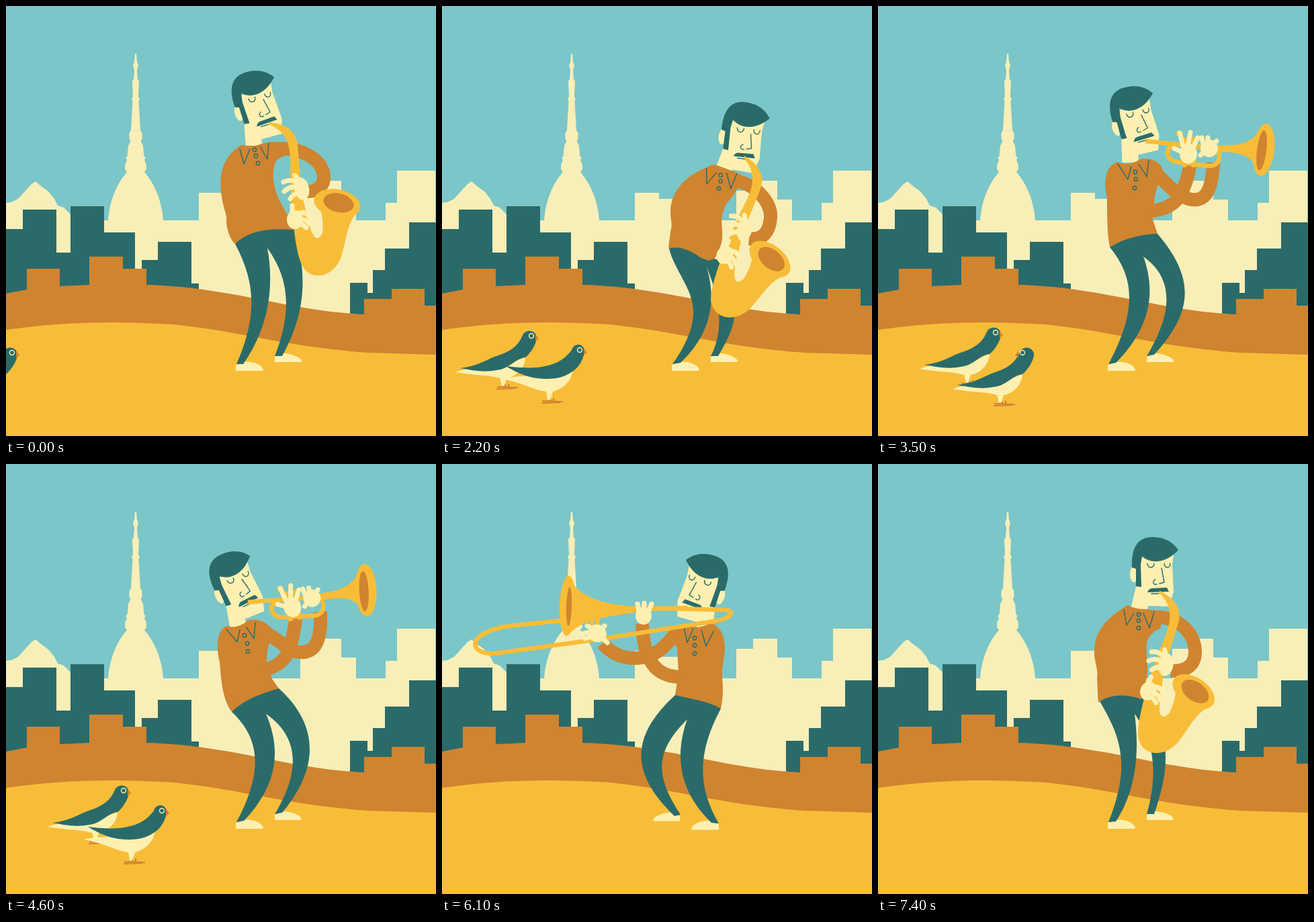
Recreate the animation shown at these times as an HTML page. Size 640 by 640 pixels, loop 7.5 s.

```html
<!DOCTYPE html>
<html lang="en">
<head>
<meta charset="utf-8">
<title>Street musician</title>
<style>
html, body { margin: 0; width: 100%; height: 100%; overflow: hidden; background: #7bc6c8; }
svg { display: block; width: 100vw; height: 100vh; }
.cream { fill: #f8eeb8; }
.skin { fill: #fdf0b0; }
.teal { fill: #2a6b6a; }
.brown { fill: #cf8430; }
.gold { fill: #f8bd38; }
.line { fill: none; stroke: #2a6b6a; stroke-width: 1.4; stroke-linecap: round; stroke-linejoin: round; }
.arm { fill: none; stroke: #cf8430; stroke-width: 20; }
.finger { fill: none; stroke: #fdf0b0; stroke-width: 7; stroke-linecap: round; }
.tube { fill: none; stroke: #f8bd38; stroke-width: 6.5; stroke-linejoin: round; }
.toe { fill: none; stroke: #cf8430; stroke-width: 2.2; stroke-linecap: round; }
</style>
</head>
<body>
<svg viewBox="0 0 640 640">
  <defs>
    <path id="spire" d="M192.5 71H194L195 83L197 88L195 95L196 110L198 111L197 135L199 138L197.5 142L200 185L202.5 189V198L200.5 201L204 208L205.5 224L208 226L206 229L209 237V243L206 247C222 266 232 290 234 319H192.5Z"/>
  </defs>
  <rect width="640" height="640" fill="#7bc6c8"/>
  <g class="cream">
    <path d="M0 293L8 292L18 287L27 277L38 265L44 261L52 268L63 276L72 287L77 297L86 300L95 309L100 319H287V278H323V287H360V319H438V275H463V260H499V288H521V319H565V293H582V245H639V470H0Z"/>
    <use href="#spire"/>
    <use href="#spire" transform="matrix(-1 0 0 1 386 0)"/>
  </g>
  <path class="teal" d="M0 332H25V303H75V367H96V298H146V337H192V391H202V378H226V351H276V413H287V430H0ZM512 470V412H538V427H546V393H564V361H600V322H640V470Z"/>
  <path class="brown" d="M0 428Q15 425 31 422V391H80V417L124 415V373H174V391H209V415C270 416 335 428 400 441C450 451 490 457 533 459V436H574V421H623V446H640V530H0Z"/>
  <path class="gold" d="M0 482C80 471 150 468 250 474C350 484 420 508 540 516L640 519V640H0Z"/>
  <g id="birds"></g>
  <g id="man"></g>
</svg>
<script>
const LOOP = 7500, STEP = 100, BEAT = 640;
const held = [40, 41, 57, 58, 60, 62, 65, 66, 70];
const birds = document.getElementById('birds');
const man = document.getElementById('man');

const NUM = /-?[\d.]+/g;
const mix = (a, b, u) => {
  const to = b.match(NUM);
  let i = 0;
  return a.replace(NUM, n => +(+n + (to[i++] - n) * u).toFixed(2));
};
const blend = (p, q, u) =>
  Object.fromEntries(Object.keys(p).map(k => [k, mix(p[k], q[k], u)]));
const nums = s => s.match(NUM).map(Number);
const path = (cls, d) => `<path class="${cls}" d="${d}"/>`;
const oval = (cls, x, y, rx, ry = rx, a = 0) =>
  `<ellipse class="${cls}" cx="${x}" cy="${y}" rx="${rx}" ry="${ry}" transform="rotate(${a} ${x} ${y})"/>`;
const group = (transform, body) => `<g transform="${transform}">${body}</g>`;
const wave = (t, t0) => (1 - Math.cos((t - t0) / BEAT * 2 * Math.PI)) / 2;

// Poses: head and horn hold x, y and angle
const saxUp = {
  head: '372 137 -17', horn: '392 174 0',
  pants: 'M341 354C365 400 380 450 343 533L353 533C390 480 400 420 389 360C413 395 432 440 400 521L411 521C450 450 446 395 430 333C400 322 365 325 341 354Z',
  shirt: 'M350 207C322 225 318 250 320 275C322 300 330 310 328 322C330 340 336 350 341 354C360 336 385 330 428 333L422 315C405 290 392 262 400 235C403 226 414 222 424 222L410 203C390 200 380 206 370 208Q357 208 350 207Z',
  arms: 'M400 213C440 208 473 230 473 255C473 270 460 277 447 276',
  collar: 'M348 213L354 235L363 213M378 209L389 228L391 204',
  buttons: '370 214 372 223 375 234'
};
const saxMid = {
  head: '412 150 0', horn: '420 190 21.6',
  pants: 'M330 353C360 405 378 445 343 533L354 532C388 480 388 420 382 372C402 400 422 445 400 521L411 521C436 450 436 395 394 349C375 333 350 333 330 353Z',
  shirt: 'M372 210C334 232 320 255 322 285C324 300 328 308 326 318C327 335 327 345 328 355C345 342 370 342 392 350L399 322C404 305 398 285 400 265C404 255 412 247 420 245L424 221C415 217 405 217 398 216Q382 216 372 210Z',
  arms: 'M408 228C445 225 472 250 472 280C472 300 458 309 436 308',
  collar: 'M366 217L370 240L381 222M395 222L404 244L411 220',
  buttons: '388 224 388 233 388 244'
};
const saxDown = {
  head: '452 186 8', horn: '452 226 26.5',
  pants: 'M338 360C352 418 410 440 343 533L355 531C410 480 406 425 394 388C402 410 428 470 400 521L411 521C442 470 445 455 412 380C390 370 375 348 338 358Z',
  shirt: 'M407 237C360 252 340 280 341 310C341 320 344 325 341 335C340 345 338 350 338 361C355 357 372 366 385 376C395 381 402 382 410 381L415 362C422 345 413 325 418 310C422 300 430 288 440 284L450 255C444 250 440 249 434 247Q418 244 407 237Z',
  arms: 'M430 260C470 265 490 295 490 315C488 340 478 350 458 348',
  collar: 'M395 243L395 266L409 250M425 250L431 273L440 251',
  buttons: '416 253 416 262 413 273'
};
const trumpetBack = {
  head: '340 171 -24', horn: '357 206 -10',
  pants: 'M336 369C380 410 382 460 343 533L354 531C408 475 408 420 387 372C435 405 440 455 400 521L411 519C465 455 468 390 406 334C380 334 355 342 336 369Z',
  shirt: 'M328 241C312 250 313 275 318 295C320 320 322 350 336 369C355 350 380 342 406 334L396 320L388 295C388 275 392 262 398 258C400 248 390 237 380 234C372 231 365 231 360 233C352 240 340 245 328 241Z',
  arms: 'M375 243C400 258 415 272 430 279C458 285 470 268 468 220M385 306C415 298 425 285 432 224',
  collar: 'M328 246L344 265L348 247M358 243L369 260L371 236',
  buttons: '355 255 359 267 360 279'
};
const trumpetFront = {
  head: '381 160 -15', horn: '395 201 0',
  pants: 'M345 359C383 405 385 455 343 533L354 531C410 475 412 420 395 373C440 405 440 455 400 521L411 519C470 455 472 405 416 339C392 332 368 337 345 359Z',
  shirt: 'M357 232C338 238 335 262 341 285C341 310 341 340 345 359C368 345 392 340 416 339L409 318L411 290C414 270 420 255 425 250C425 238 415 230 405 228C395 226 388 229 385 231C378 235 365 237 357 232Z',
  arms: 'M404 240C425 258 440 280 462 287C485 293 497 280 499 233M405 306C440 300 455 290 465 234',
  collar: 'M357 235L372 258L377 239M388 235L400 254L403 230',
  buttons: '383 247 384 258 382 271'
};
const trombone = {
  head: '389.5 174.5 -18', horn: '0 0 0',
  pants: 'M347 344C275 410 285 465 346 524L355 522C318 465 315 430 365 380C347 430 350 485 401 534L412 535C380 480 380 430 415 364C395 344 370 342 347 344Z',
  shirt: 'M357 239C350 240 345 244 340 250L350 275L352 310L347 344C370 350 395 352 415 364C418 350 419 335 417 318C416 300 421 290 421 272C420 250 410 240 400 236C385 246 370 243 357 239Z',
  arms: 'M348 252C330 275 315 288 290 289C265 290 248 278 239 267M354 317C322 316 300 298 298 238',
  collar: 'M360 243L365 266L374 245M386 247L393 271L404 249',
  buttons: '376 259 376 270 376 282'
};

const face =
  path('skin', 'M-26 -10L28 -16L26 0L28 40L21 62L-10 61L-12 72L-36 66L-28 32Z') +
  oval('skin', -31, 14, 6, 12) +
  path('teal', 'M35 -22C24 -38 8 -42 -8 -41C-26 -39 -35 -25 -34 4L-28 6L-28 32L-20 33L-21 0L-19 -13C-8 -2 15 0 35 -22Z') +
  path('line', 'M-11 -2C-11 6 -1 6 -1 -2M14 -2C14 6 23 6 23 -2M10 5L14 26L7 28M1 22C-4 23 -3 31 3 29M-5 43H6') +
  path('teal', 'M-11 41Q-9 35 -4 35L18 34L21 40Z');

const shoes =
  path('skin', 'M342 534L355 530C367 528 380 534 383 541Q383 543 379 543H342Z') +
  path('skin', 'M400 522L412 517C425 517 438 523 440 528Q440 530 436 530H400Z');

const saxHorn =
  path('gold', 'M391 173C412 175 430 182 434 205L440 280C446 300 450 325 455 336Q463 354 471 338C473 320 470 300 460 285L525 305C508 320 507 345 500 370C490 405 450 414 438 380C428 350 424 290 423 250C424 215 424 190 391 176Z') +
  oval('gold', 493, 294, 35, 21, 12) + oval('brown', 495, 293, 23, 14, 14) +
  oval('skin', 440, 272, 11, 17, -12) +
  path('finger', 'M438 263L430 252M436 264Q424 256 413 262M436 271Q424 266 414 276M438 279Q428 278 423 287') +
  oval('skin', 430, 318, 12, 14) +
  path('finger', 'M426 316L426 297M432 310Q446 304 451 313M434 317Q446 316 452 324M432 324Q442 324 447 330');

const trumpetHorn =
  path('tube', 'M398 201L505 212M445 208C426 206 426 230 445 232L490 238C512 240 512 216 500 212') +
  path('gold', 'M490 207L525 207C552 206 562 195 574 177L570 250C560 230 550 220 525 218L490 216Z') +
  oval('gold', 574, 214, 16, 39, 7) + oval('brown', 571, 215, 7, 30, 7) +
  path('tube', 'M444 190H454M456 195V240M470 195V240') +
  oval('skin', 493, 212, 13, 13) +
  path('finger', 'M484 206L482 196M491 205L491 196M498 206L504 201M486 216L480 222') +
  oval('skin', 462, 220, 13, 15) +
  path('finger', 'M455 212L449 189M461 210L465 188M468 212L476 196M452 217L441 212');

const tromboneHorn = ext => {
  const slide = mix(
    'M178 233L100 241C30 252 40 288 85 281L240 260L405 234C435 229 438 216 415 217L290 214',
    'M178 233L89 241C19 252 29 288 74 281L240 260L405 234C435 229 438 216 415 217L290 214', ext);
  return path('tube', slide) +
    path('gold', 'M190 169C200 196 240 212 300 212L366 211V217L300 219C250 226 205 232 190 253Z') +
    oval('gold', 187, 211, 12, 45, 2) + oval('brown', 189, 212, 4, 29, 2) +
    path('tube', 'M222 225L224 245M230 225L232 245') +
    oval('skin', 231, 252, 14, 13, 30) +
    path('finger', 'M222 250L211 252M224 256L213 260M226 246L216 241M236 246L242 241M240 260L246 266') +
    oval('skin', 300, 226, 12, 13) +
    path('finger', 'M293 218L291 208M301 216L301 207M308 218L312 208');
};

function figure(pose, horn, pivot, flip = 1) {
  const [hx, hy, ha] = nums(pose.head);
  const [x, y, a] = nums(pose.horn);
  const b = nums(pose.buttons);
  return group(`translate(${hx} ${hy}) scale(${flip} 1) rotate(${ha})`, face) +
    path('teal', pose.pants) + path('brown', pose.shirt) + path('arm', pose.arms) +
    path('line', pose.collar) +
    [0, 2, 4].map(i => oval('line', b[i], b[i + 1], 2.7)).join('') +
    group(`translate(${x} ${y}) rotate(${a}) translate(${pivot})`, horn);
}

function playSax(u) {
  const knot = 0.55;
  const pose = u < knot ? blend(saxUp, saxMid, u / knot)
    : blend(saxMid, saxDown, (u - knot) / (1 - knot));
  return shoes + figure(pose, saxHorn, '-392 -174');
}

function playTrumpet(t) {
  const u = (wave(t, 4562) - 0.034) / 0.736;
  return shoes + figure(blend(trumpetBack, trumpetFront, u), trumpetHorn, '-395 -201');
}

function playTrombone(t) {
  const w = wave(t, 6100);
  const turn = Math.max(0, (t - 6600) / 300) * 0.1;
  const lean = 0.045 * w - turn;
  const sway = `translate(0 533) matrix(1 0 ${lean} ${1 + 0.013 * w} 0 0) translate(0 -533)`;
  return group('matrix(-1 0 0 1 754 1.5)', shoes) +
    group(sway, figure(trombone, tromboneHorn(w), '0 0', -1));
}

// Each key: time, x and y of the feet, pitch from upright to level
const backBird = [
  [0, -90, 566, 0], [400, -10, 566, 1], [800, 60, 568, 0], [1200, 100, 567, 1],
  [1600, 90, 567, 0.3], [2200, 96, 567, 0], [2800, 120, 563, 0.8], [3300, 138, 562, 0],
  [4800, 138, 562, 0], [4900, 130, 552, 1], [5500, -120, 540, 1]
];
const frontBird = [
  [0, -28, 592, 0], [400, 30, 592, 1], [800, 95, 592, 0], [1000, 118, 590, 1],
  [1200, 140, 592, 0], [1700, 152, 590, 0.6], [2200, 163, 588, 1], [2800, 177, 590, 0.5],
  [3300, 187, 592, 0], [3900, 187, 592, 0], [4200, 190, 592, 1], [4800, 190, 592, 1],
  [4900, 170, 570, 1], [5500, -120, 555, 1]
];

function track(keys, t) {
  const i = keys.findIndex(k => k[0] > t);
  if (i < 0) return null;
  const a = keys[i - 1], b = keys[i], u = (t - a[0]) / (b[0] - a[0]);
  return a.slice(1).map((v, j) => v + (b[j + 1] - v) * u);
}

function bird(keys, t, looksBack) {
  const at = track(keys, t);
  if (!at) return '';
  const [x, y, p] = at;
  const belly = mix(
    'M-76 -22C-50 -32 -10 -28 28 -44C28 -30 15 -15 0 -13L-3 -2L-7 -2L-10 -13C-25 -18 -50 -17 -76 -22Z',
    'M-74 -33C-50 -40 -10 -34 31 -45C31 -32 18 -18 2 -14L-2 -2L-6 -2L-8 -14C-25 -16 -45 -28 -74 -33Z', p);
  const back = mix(
    'M-69 -28C-45 -31 -32 -39 -18 -45C0 -51 16 -57 24 -77C28 -86 42 -86 45 -75C46 -66 36 -50 28 -44C12 -42 5 -27 -15 -25C-35 -21 -50 -25 -69 -28Z',
    'M-68 -52C-50 -50 -38 -49 -22 -50C4 -53 18 -60 30 -76C33 -86 46 -87 49 -76C49 -64 41 -50 31 -44C15 -32 -5 -32 -22 -34C-42 -37 -56 -45 -68 -52Z', p);
  const side = looksBack ? -1 : 1;
  const eyeX = looksBack ? 28 : 37 + 5 * p;
  const head = path('brown', 'M6 -3L11 4L6 8Z') + oval('skin', 0, 0, 4.2) + oval('teal', 0, 0, 2.8);
  return group(`translate(${x} ${y}) scale(${t < 4900 ? 1 : -1} 1)`,
    path('toe', 'M-3 -4L-1 0M3 -4V0M-13 0L16 1M-14 3L12 2') +
    path('skin', belly) + path('teal', back) +
    group(`translate(${eyeX} -76) scale(${side} 1)`, head));
}

function scene(t) {
  birds.innerHTML = bird(backBird, t, false) + bird(frontBird, t, t >= 3300 && t < 4200);
  if (t < 2400) {
    const phase = t / BEAT % 1;
    man.innerHTML = playSax(Math.min(1, 1.12 * (1 - Math.abs(1 - 2 * phase))));
  } else if (t < 4900) man.innerHTML = playTrumpet(t);
  else if (t < 7100) man.innerHTML = playTrombone(t);
  else man.innerHTML = playSax(0.3 + 0.25 * (t - 7100) / 300);
}

let shown = -1;
function tick() {
  let step = Math.floor(performance.now() % LOOP / STEP);
  while (held.includes(step)) step--;
  if (step !== shown) scene((shown = step) * STEP);
  requestAnimationFrame(tick);
}
tick();
</script>
</body>
</html>
```
